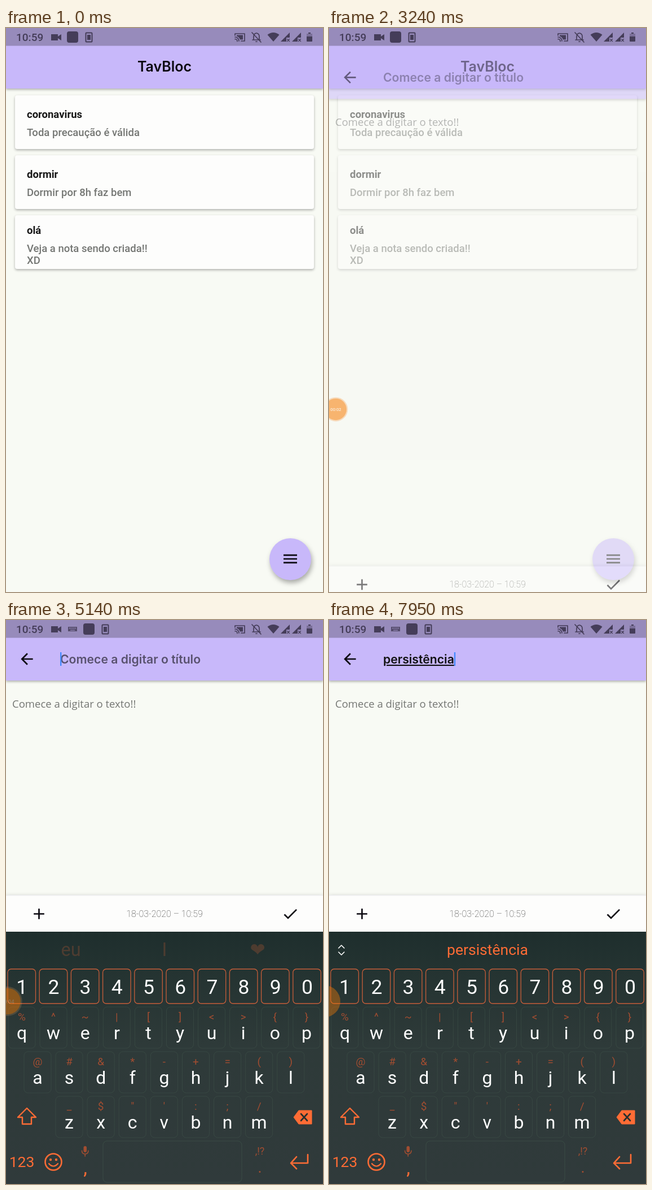
An HTML page that plays this animation: 562x997 px, repeating every 8 s.

```html
<!DOCTYPE html>
<html lang="pt">
<head>
<meta charset="utf-8">
<title>Notas</title>
<style>
  html, body { margin: 0; width: 100%; height: 100%; overflow: hidden; background: #f8faf4; }
  svg { display: block; width: 100%; height: 100%; }
  text { font-family: Roboto, sans-serif; white-space: pre; }
  .inter { font-family: Inter, sans-serif; font-weight: 600; }
  .open { font-family: "Open Sans", sans-serif; }
  .mid { text-anchor: middle; }
  .line { fill: none; stroke-linecap: round; stroke-linejoin: round; }
  .low { filter: drop-shadow(0 2px 2px rgba(0, 0, 0, .3)); }
  .high { filter: drop-shadow(2px 5px 4px rgba(0, 0, 0, .32)); }
  .raised { filter: drop-shadow(0 4px 5px rgba(0, 0, 0, .5)); }
  .composing { text-decoration: underline; text-decoration-thickness: 2px; }
</style>
</head>
<body>
<svg id="stage" viewBox="0 0 562 997" preserveAspectRatio="none">
  <defs>
    <linearGradient id="board" x1="0" y1="0" x2="0" y2="1">
      <stop offset="0" stop-color="#1e2e2d"/>
      <stop offset=".15" stop-color="#243331"/>
      <stop offset=".45" stop-color="#2e3a39"/>
      <stop offset="1" stop-color="#303a3b"/>
    </linearGradient>
  </defs>
</svg>
<script>
const LOOP = 8000, LILAC = '#c8b8fa', ORANGE = '#ff6c35', DIM = '#a14d31', GREY = '#707b79', PAPER = '#f8faf4';
const stage = document.getElementById('stage');

const ICONS = {
  menu: 'M3 18h18v-2H3v2zm0-5h18v-2H3v2zm0-7v2h18V6H3z',
  close: 'M19 6.4L17.6 5 12 10.6 6.4 5 5 6.4l5.6 5.6L5 17.6 6.4 19l5.6-5.6 5.6 5.6 1.4-1.4-5.6-5.6z',
  add: 'M19 13h-6v6h-2v-6H5v-2h6V5h2v6h6v2z',
  edit: 'M3 17.25V21h3.75L17.8 9.94l-3.75-3.75zM20.7 7.04a1 1 0 0 0 0-1.41l-2.34-2.34a1 1 0 0 0-1.41 0l-1.83 1.83 3.75 3.75z',
  bulb: 'M9 20h6v1a1 1 0 0 1-1 1h-4a1 1 0 0 1-1-1zM12 2a7 7 0 0 0-4 12.74V17a1 1 0 0 0 1 1h6a1 1 0 0 0 1-1v-2.26A7 7 0 0 0 12 2zm2.85 11.1l-.85.6V16h-4v-2.3l-.85-.6a5 5 0 1 1 5.7 0z',
  back: 'M20 11H7.83l5.59-5.59L12 4l-8 8 8 8 1.41-1.41L7.83 13H20z',
  check: 'M9 16.17L4.83 12l-1.42 1.41L9 19 21 7l-1.41-1.41z'
};

const icon = (name, x, y) =>
  `<g transform="translate(${x} ${y}) scale(1.333)"><path transform="translate(-12 -12)" d="${ICONS[name]}" fill="#0b0910"/></g>`;
const text = (x, y, str, size, fill, cls = '', extra = '') =>
  `<text x="${x}" y="${y}" font-size="${size}" fill="${fill}" class="${cls}" ${extra}>${str}</text>`;
const rect = (x, y, w, h, fill, extra = '') =>
  `<rect x="${x}" y="${y}" width="${w}" height="${h}" fill="${fill}" ${extra}/>`;
const line = (d, color, width, extra = '') =>
  `<path class="line" d="${d}" stroke="${color}" stroke-width="${width}" ${extra}/>`;

function card(y, titleY, title, ...rows) {
  return rect(16, y, 530, 95, '#fdfdfc', 'rx="4" class="low"') +
    text(37, titleY, title, 18.5, '#171717', '', 'font-weight="700"') +
    rows.map((row, i) => text(37, titleY + 32 + i * 21, row, 18.5, '#747673', '', 'font-weight="500"')).join('');
}

function home() {
  const dial = [['add', 706], ['edit', 779], ['bulb', 852]].map(([name, y], i) =>
    `<g id="dial${i}"><circle cx="504" cy="${y}" r="27" fill="${LILAC}" class="high"/>${icon(name, 504, y)}</g>`).join('');
  return rect(0, 0, 562, 997, PAPER) + rect(0, 0, 562, 107, LILAC, 'class="low"') +
    text(281, 77, 'TavBloc', 25, '#0b0910', 'inter mid') +
    card(119, 159, 'coronavirus', 'Toda precaução é válida') +
    card(225, 265, 'dormir', 'Dormir por 8h faz bem') +
    card(331, 364, 'olá', 'Veja a nota sendo criada!!', 'XD') + dial +
    `<circle cx="504" cy="939" r="37" fill="${LILAC}" class="high"/>` +
    `<g id="menuIcon">${icon('menu', 504, 938.5)}</g><g id="closeIcon">${icon('close', 503.5, 938.5)}</g>`;
}

function editor() {
  return rect(0, 0, 562, 1200, PAPER) + rect(0, 0, 562, 107, LILAC, 'class="low"') +
    icon('back', 37, 69) +
    text(96, 77, '', 21.2, '#111', 'inter', 'id="title"') +
    rect(96, 57, 2.4, 24, '#448aff', 'id="caret"') +
    text(11, 155, 'Comece a digitar o texto!!', 18.5, '#747673', 'open') +
    `<g id="bar">${rect(0, 487, 562, 64, '#fdfdfc', 'class="raised"')}` +
    rect(0, 486, 562, 1.5, '#eeeef0') + icon('add', 58.5, 519.5) +
    text(281, 525, '18-03-2020 – 10:59', 16, '#333', 'mid', 'font-weight="100"') +
    icon('check', 504, 519.5) + '</g>';
}

function keyRow(keys, symbols, firstX, top) {
  return [...keys].map((key, i) => {
    const x = firstX + i * 56.1;
    return rect(x - 24, top, 48, 73, 'none', 'rx="7" stroke="#4c6655" stroke-opacity=".33"') +
      text(x, top + 24, symbols[i].replace('&', '&amp;').replace('<', '&lt;'), 19, DIM, 'mid') +
      text(x, top + 56.5, key, 32, '#fff', 'mid');
  }).join('');
}

function keyboard() {
  const digits = [...'1234567890'].map((d, i) =>
    rect(3 + i * 56.2, 617, 49.5, 61, 'none', 'rx="6" stroke="#c65e3a" stroke-width="1.3"') +
    text(28.2 + i * 56.2, 660.5, d, 35.5, '#fff', 'mid')).join('');
  return rect(0, 551, 562, 446, 'url(#board)') +
    line('M17 580l5-5 5 5M17 587l5 5 5-5', '#fff', 1.6, 'id="expand"') +
    `<g id="words">${[115, 281, 446].map(x => text(x, 594, '', 32, GREY, 'mid')).join('')}</g>` + digits +
    keyRow('qwertyuiop', '%^~|[]<>{}', 28, 684) +
    keyRow('asdfghjkl', '@#&*-+=()', 56, 763) +
    keyRow('zxcvbnm', `_$"':;/`, 112, 842) +
    line('M37 863l16 16h-8v12h-16v-12h-8z', ORANGE, 2.4) +
    `<path d="M510 879l9-12h23v24h-23z" fill="${ORANGE}" stroke="${ORANGE}" stroke-linejoin="round"/>` +
    line('M523 873l11 12M534 873l-11 12', '#26302f', 2.6) +
    text(28, 967, '123', 26.5, ORANGE, 'mid') +
    `<circle cx="84" cy="958" r="14.5" fill="none" stroke="${ORANGE}" stroke-width="2.6"/>` +
    `<circle cx="79" cy="954" r="2.2" fill="${ORANGE}"/><circle cx="89" cy="954" r="2.2" fill="${ORANGE}"/>` +
    line('M76 961q8 9 16 0', ORANGE, 2.2) +
    rect(137.5, 930, 5.5, 11, DIM, 'rx="2.7"') + line('M134.5 938q0 6 5.7 6t5.7-6M140.2 944v4', DIM, 1.6) +
    text(140.5, 980, ',', 34, ORANGE, 'mid') +
    rect(172, 921, 246, 73, 'none', 'rx="7" stroke="#4c6655" stroke-opacity=".4"') +
    text(450, 945, ',!?', 18, DIM, 'mid') + text(450, 977, '.', 27, DIM, 'mid') +
    line('M535 945v15h-29M515 949l-10 11 10 10', ORANGE, 2.6);
}

function statusBar() {
  const ink = '#453d59', back = '#978bbb';
  const signal = x => `<path d="M${x} 24l16-16v9h-6v7z" fill="${ink}"/>` +
    line(`M${x + 11.5} 19.5l4 4m0-4l-4 4`, ink, 1.3);
  const keys = [0, 1, 2, 3, 4].map(i => rect(112 + i * 2.6, 13.5, 1.4, 2, back)).join('');
  return rect(0, 0, 562, 31.5, back) +
    text(18, 23, '10:59', 19, ink, '', 'font-weight="500"') +
    `<path d="M80 11h12v4l6-4v11l-6-4v4H80z" fill="${ink}"/>` +
    `<g id="keysIcon">${rect(110, 12, 16, 8, ink, 'opacity=".8"')}${keys}${rect(114, 17.5, 8, 1.2, back)}</g>` +
    `<g id="leftIcons">${rect(108, 6, 20, 20, ink, 'rx="4"')}` +
    rect(141.5, 8.5, 11, 16, 'none', `rx="1" stroke="${ink}" stroke-width="2"`) + rect(144, 12, 6, 9, ink) + '</g>' +
    '<g id="rightIcons">' +
    line('M406 13v-3h17v13h-6M406 16a7 7 0 0 1 7 7M406 19.5a4 4 0 0 1 4 4', ink, 1.7) +
    `<path d="M409 12.500h11v8h-5q-2-5-6-6z" fill="${ink}"/>` +
    line('M437 21h14M439 21v-6q0-5 5-6 5 1 5 6v6M443 24h2M436 8l16 17', ink, 1.7) + '</g>' +
    `<path id="upArrow" d="M455 14l3-4 3 4z" fill="${ink}"/><path id="downArrow" d="M455 16l3 4 3-4z" fill="${ink}"/>` +
    `<path d="M474 24L463.5 12q10.5-8 21 0z" fill="${ink}"/>` + signal(487) + signal(507) +
    rect(533, 10, 10, 14, ink, 'rx="1"') + rect(536, 8, 4, 3, ink) + rect(533, 10, 10, 5, '#7a6f98');
}

const bubble = '<circle id="ring" r="28.5" fill="#f7ac66"/><circle r="25.5" fill="#f77c04"/>' +
  text(0, 4, '', 10.5, '#fff', 'mid', 'id="timer"');

stage.insertAdjacentHTML('beforeend',
  `<g>${home()}</g><g id="editor">${editor()}</g><g id="keyboard">${keyboard()}</g><g id="bubble">${bubble}</g><g>${statusBar()}</g>`);

const el = {};
stage.querySelectorAll('[id]').forEach(node => { el[node.id] = node; });
const words = [...el.words.children];

// start time, typed title, then the left, centre and right suggestions
const TYPING = [
  [0, '', 'eu', 'I', '❤'],
  [5180, 'p', 'por', 'para', 'pra'],
  [5400, 'pe', 'pelo', 'pela', 'pe'],
  [5600, 'per', 'perto', 'por', 'perdi'],
  [5790, 'pers', 'perto', 'pera', 'perdi'],
  [5990, 'persi', 'persistindo', 'perdi', 'perdi o'],
  [6210, 'persid', 'perdido', 'perdi', 'persiga'],
  [6430, 'persidt', 'persista', 'persiste', 'persisti'],
  [6640, 'persidte', 'persistem', 'persiste', 'persistente'],
  [6840, 'persidten', 'persistent', 'persistem', 'persistência'],
  [7090, 'persidtenc', 'persistem', 'persistência', 'persistências'],
  [7300, 'persidtenci', 'persistem', 'persistência', 'persistências'],
  [7500, 'persidtencia', '', 'persistência', ''],
  [7680, 'persistência', '', 'persistência', '']
];

const ramp = (t, start, length) => Math.min(1, Math.max(0, (t - start) / length));
const within = (t, a, b) => t >= a && t < b;
const show = (node, on) => node.setAttribute('opacity', +on);
const move = (node, x, y, rest = '') => node.setAttribute('transform', `translate(${x} ${y}) ${rest}`);
const setText = (node, str) => { if (node.textContent !== str) node.textContent = str; };

function bezier(x, x1, y1, x2, y2) {
  const at = (s, a, b) => 3 * s * (1 - s) * (1 - s) * a + 3 * s * s * (1 - s) * b + s * s * s;
  let lo = 0, hi = 1;
  for (let i = 0; i < 16; i++) {
    const s = (lo + hi) / 2;
    if (at(s, x1, x2) < x) lo = s; else hi = s;
  }
  return at(lo, y1, y2);
}

function drawMenu(t) {
  const open = delay => ramp(t, 1250 + delay, 150) * (1 - ramp(t, 2830, 170));
  [100, 50, 0].forEach((delay, i) => {
    const s = open(delay), y = 706 + 73 * i;
    move(el['dial' + i], 504, y, `scale(${s}) translate(-504 ${-y})`);
    show(el['dial' + i], s > 0);
  });
  const p = open(0);
  el.menuIcon.setAttribute('transform', `rotate(${p * 90} 504 939)`);
  el.closeIcon.setAttribute('transform', `rotate(${p * 90 - 90} 504 939)`);
  show(el.menuIcon, 1 - p);
  show(el.closeIcon, p);
}

// Long suggestions shrink to the room they have.
function drawWord(node, word, room, fill) {
  setText(node, word);
  node.setAttribute('font-size', 32.5);
  const size = 32.5 * Math.min(1, room / (node.getComputedTextLength() || 1));
  node.setAttribute('font-size', size);
  node.setAttribute('y', 583 + size * .35);
  node.setAttribute('fill', fill);
}

function drawEditor(t) {
  const p = ramp(t, 3038, 300);
  move(el.editor, 0, 249 * (1 - bezier(p, .4, 0, .2, 1)));
  show(el.editor, bezier(p, .42, 0, 1, 1));
  move(el.bar, 0, t < 4460 ? 446 : 0);

  const [since, typed, ...suggestions] = TYPING.filter(step => step[0] <= t).pop();
  setText(el.title, typed || 'Comece a digitar o título');
  el.title.setAttribute('class', typed ? 'inter composing' : 'inter');
  el.title.setAttribute('fill', typed ? '#111' : 'rgba(0,0,0,.56)');
  el.caret.setAttribute('x', 96 + (typed ? el.title.getComputedTextLength() : 0));
  const phase = (t - (typed ? since : 4040)) % 1000;
  show(el.caret, t > 4040 ? 1 - ramp(phase, 450, 150) + ramp(phase, 900, 100) : 0);

  show(el.expand, typed !== '');
  show(el.words, typed ? 1 : .2);
  suggestions.forEach((word, i) =>
    drawWord(words[i], word, i === 1 ? 144 : 107, i === 1 || !typed ? ORANGE : GREY));
}

function drawKeyboard(t) {
  const p = ramp(t, 4491, 150);
  move(el.keyboard, 0, 446 * (1 - p) ** 2);
  show(el.keyboard, p);
}

function drawBubble(t) {
  const shrink = ramp(t, 2450, 300), dock = ramp(t, 5000, 300), enter = ramp(t, 450, 250);
  const x = -30 + 59 * enter - 17 * shrink - 20 * dock;
  move(el.bubble, x, 674, `scale(${1 - .25 * shrink + .35 * dock})`);
  show(el.bubble, (enter > 0) * (1 - .45 * shrink - .15 * dock));
  show(el.ring, .7 * (1 - dock));
  setText(el.timer, '00:0' + Math.max(0, Math.floor((t - 400) / 1000)));
  show(el.timer, 1 - dock);
}

function drawStatus(t) {
  const typing = t >= 4750;
  const both = within(t, 1760, 2560), down = within(t, 5980, 6750);
  show(el.keysIcon, typing);
  move(el.leftIcons, typing ? 29 : 0, 0);
  move(el.rightIcons, both || down ? -9 : 0, 0);
  show(el.upArrow, both);
  show(el.downArrow, both || down);
}

const start = performance.now();
function frame() {
  const t = (performance.now() - start) % LOOP;
  [drawMenu, drawEditor, drawKeyboard, drawBubble, drawStatus].forEach(draw => draw(t));
  requestAnimationFrame(frame);
}
frame();
</script>
</body>
</html>
```
